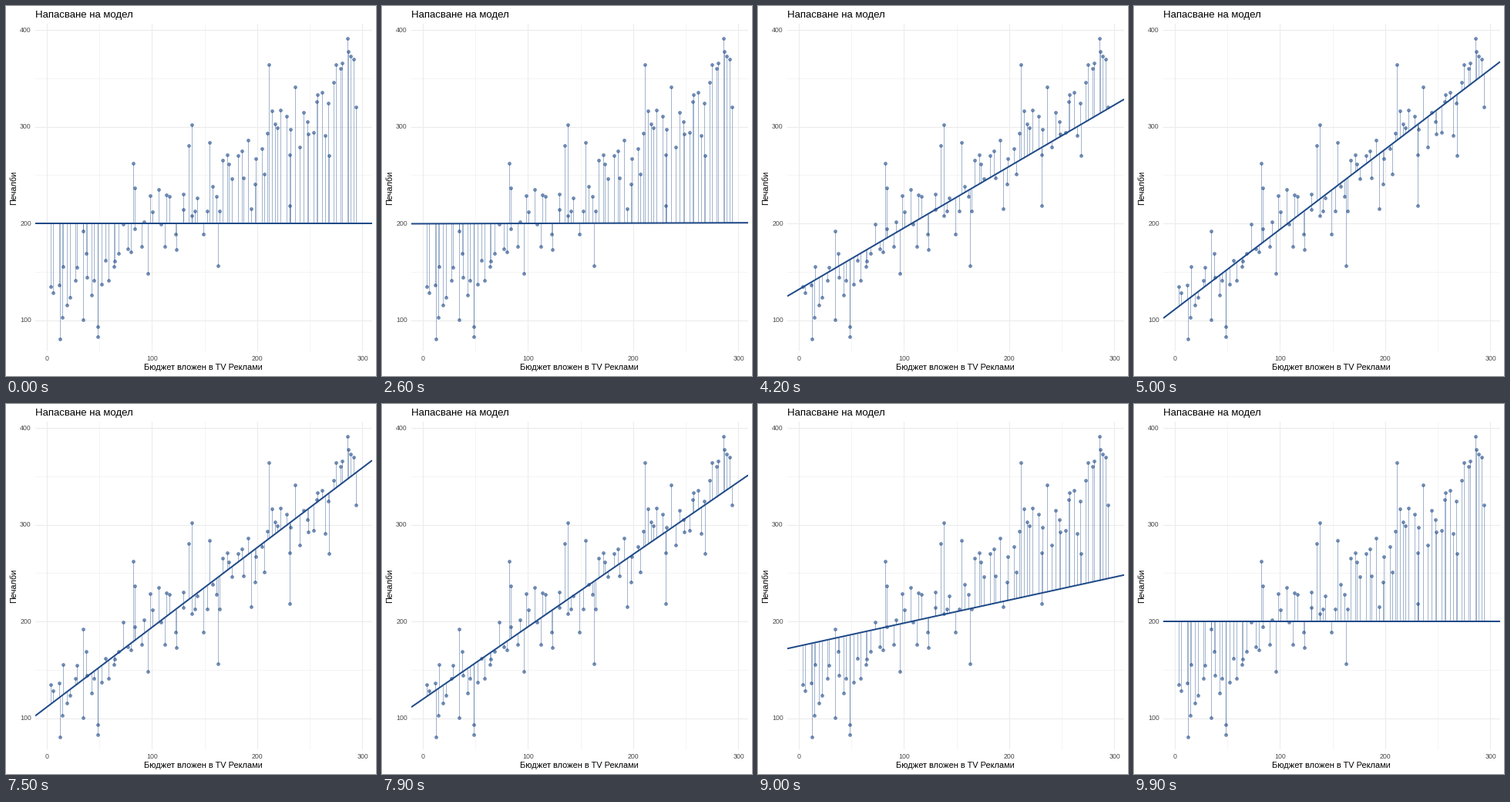
These frames come from a looping animation (480x480 px, 10000 ms). A matplotlib script:

```python
import numpy as np
import matplotlib.pyplot as plt
from matplotlib.animation import FuncAnimation

SIZE, DPI = 480, 72          # at 72 dpi one point is one pixel
STEP, FRAMES = 100, 100      # ms per frame, frames per loop
TWEEN = 25                   # frames per transition
RISE, FALL = 25, 74          # last resting frame before each transition
LEFT, RIGHT, TOP, BOTTOM = 38, 475, 23, 448
MEAN, BASE, SLOPE = 200, 111.1, 0.828
BLUE, GRID, GREY = "#1f4a88", "#ebebeb", "#4d4d4d"

plt.rcParams["font.family"] = "Liberation Sans"


def px(v):
    return 53 + 1.365 * v


def py(v):
    return 533 - 1.255 * v


def ease(t):
    return (1 - np.cos(np.pi * np.clip(t, 0, 1))) / 2


def predict(x, share):
    """Blend of the flat mean line (share 0) and the fitted line (share 1)."""
    return MEAN + (BASE + SLOPE * x - MEAN) * share


def sample(n=87):
    """Noisy linear data plus the observations furthest from the trend."""
    rng = np.random.default_rng(12)
    x = 5 + 285 * (np.arange(n) + rng.random(n)) / n
    y = predict(x, 1) + np.clip(rng.normal(0, 27, n), -58, 58)
    far = np.array([(3.7, 135), (14.7, 103), (34.7, 192), (48.1, 83),
                    (81.7, 262), (138, 302), (163, 156), (211, 364),
                    (230.5, 218), (268, 270), (286, 391), (291.5, 370),
                    (294, 320)])
    return np.append(x, far[:, 0]), np.append(y, far[:, 1])


fig = plt.figure(figsize=(SIZE / DPI, SIZE / DPI), dpi=DPI, facecolor="white")
ax = fig.add_axes([LEFT / SIZE, 1 - BOTTOM / SIZE,
                   (RIGHT - LEFT) / SIZE, (BOTTOM - TOP) / SIZE])
xlim = np.array([(LEFT - 53) / 1.365, (RIGHT - 53) / 1.365])
ax.set_xlim(xlim)
ax.set_ylim((533 - BOTTOM) / 1.255, (533 - TOP) / 1.255)


def label(x, y, text, size, color="black", ha="center", angle=0):
    fig.text(x / SIZE, 1 - y / SIZE, text, size=size, color=color, ha=ha,
             va="baseline", rotation=angle, rotation_mode="anchor")


xticks, yticks = range(0, 301, 100), range(100, 401, 100)
ax.set_xticks(xticks)
ax.set_yticks(yticks)
ax.set_xticks(range(50, 300, 100), minor=True)
ax.set_yticks(range(150, 400, 100), minor=True)
ax.grid(which="major", color=GRID, lw=1.07)
ax.grid(which="minor", color=GRID, lw=0.53)
ax.set_axisbelow(True)
ax.tick_params(which="both", length=0, labelleft=False, labelbottom=False)
for spine in ax.spines.values():
    spine.set_visible(False)

for v in xticks:
    label(px(v), 459.5, str(v), 8.8, GREY)
for v in yticks:
    label(32.8, py(v) + 2.8, str(v), 8.8, GREY, "right")
label(LEFT, 15.5, "Напасване на модел", 13.2, ha="left")
label(255.7, 472.5, "Бюджет вложен в TV Реклами", 11)
label(13.5, 235.5, "Печалби", 11, angle=90)

xs, ys = sample()
ax.scatter(xs, ys, s=3.9 ** 2, color=BLUE, alpha=0.6, linewidths=0.7, zorder=3)
stems = ax.vlines(xs, ys, ys, color=BLUE, lw=0.9, alpha=0.45, zorder=4)
model, = ax.plot([], [], color=BLUE, lw=2, solid_capstyle="butt", zorder=5)


def draw(i):
    share = ease((i - RISE) / TWEEN) - ease((i - FALL) / TWEEN)
    ends = predict(xs, share)
    stems.set_segments([[(x, a), (x, b)] for x, a, b in zip(xs, ys, ends)])
    model.set_data(xlim, predict(xlim, share))
    return stems, model


def reset():
    return draw(0)


anim = FuncAnimation(fig, draw, frames=FRAMES, init_func=reset,
                     interval=STEP, repeat=True, repeat_delay=0)
plt.show()
```
